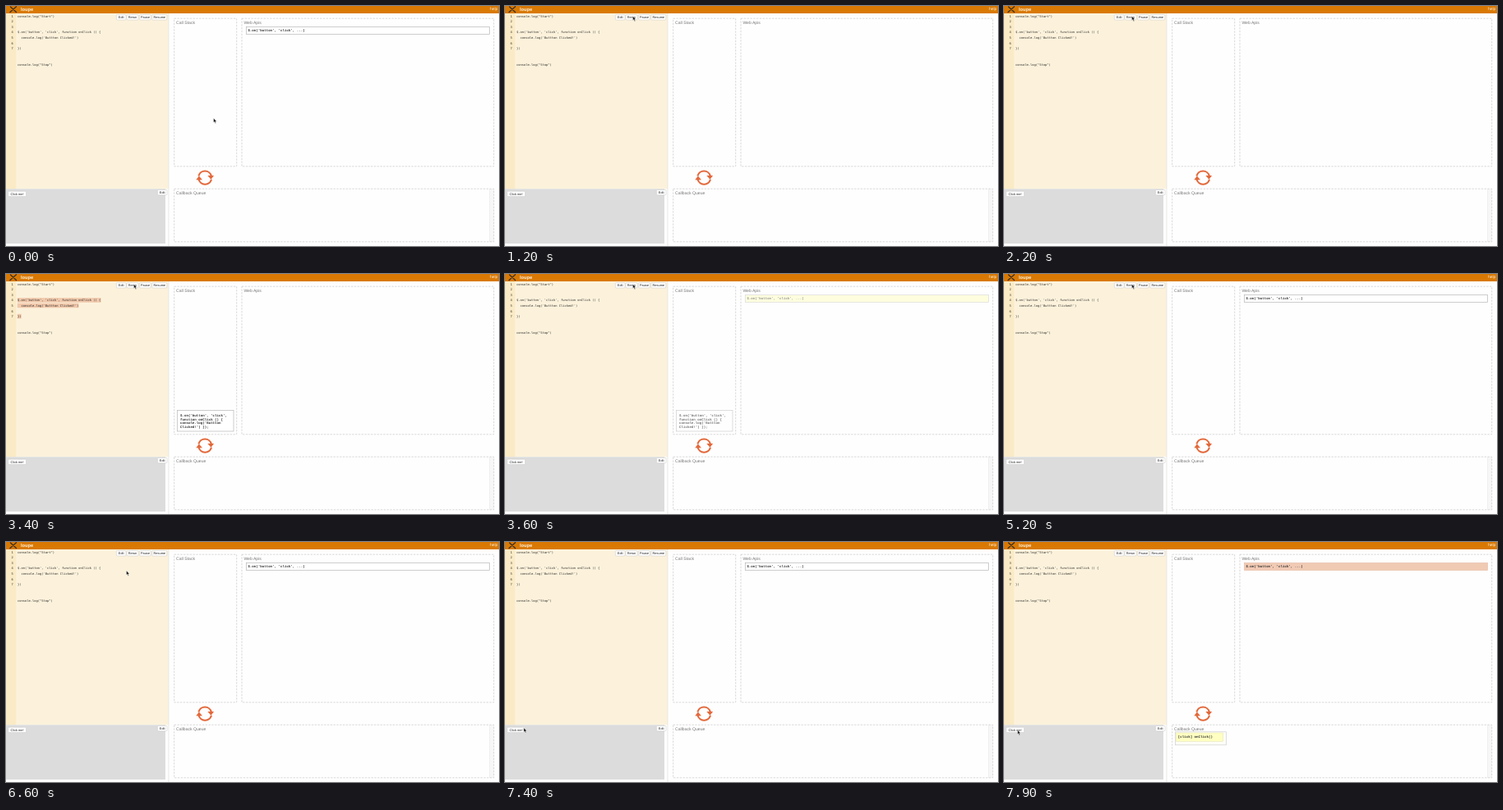
These frames come from a looping animation (600x293 px, 8 s). An HTML page:

```html
<!DOCTYPE html>
<html lang="en">
<head>
<meta charset="utf-8">
<title>Event loop demo</title>
<style>
html, body { margin: 0; width: 100%; height: 100%; overflow: hidden; background: #fefefe; }
svg { display: block; width: 600px; height: 293px; }
text { white-space: pre; text-rendering: geometricPrecision; }
.ui { font-family: "Liberation Sans", Arial, sans-serif; }
.code { font: 3.74px "DejaVu Sans Mono", monospace; fill: #2e2c28; }
.item { font: bold 4.13px "Liberation Mono", monospace; fill: #333; }
</style>
</head>
<body>
<svg id="stage" viewBox="0 0 600 293"></svg>
<script>
const LOOP = 8000, STEP = 100;
const stage = document.getElementById('stage');

function add(tag, attrs, parent = stage, content) {
  const el = document.createElementNS('http://www.w3.org/2000/svg', tag);
  for (const key in attrs) el.setAttribute(key, attrs[key]);
  if (content !== undefined) el.textContent = content;
  parent.appendChild(el);
  return el;
}
const rect = (x, y, width, height, fill, more = {}, parent = stage) =>
  add('rect', { x, y, width, height, fill, ...more }, parent);
const group = () => add('g', {});
const label = (x, y, size, fill, str, more = {}) =>
  add('text', { class: 'ui', x, y, 'font-size': size, fill, ...more }, stage, str);
const show = (el, opacity) => el.setAttribute('opacity', opacity);
const clamp = v => Math.max(0, Math.min(1, v));

function button(x, y, w, str) {
  rect(x, y, w, 6.4, '#fff', { rx: 1, stroke: '#c6c6c6', 'stroke-width': .5 });
  label(x + w / 2, y + 4.6, 3.9, '#222', str, { 'text-anchor': 'middle' });
}

function panel(x, y, w, h, title) {
  rect(x, y, w, h, 'none', { stroke: '#c9c9c9', 'stroke-width': .7, 'stroke-dasharray': '2.4 1.4' });
  label(x + 2.4, y + 7, 5.1, '#777', title);
}

// Boxed task: fill can be tinted, the whole can fade
function task(x, y, w, h, lines, tx, ty) {
  const g = group();
  const box = rect(x, y, w, h, '#fff', { stroke: '#b8b8b8', 'stroke-width': .7 }, g);
  lines.forEach((s, i) => add('text', { class: 'item', x: tx, y: ty + i * 4.6 }, g, s));
  return { g, box };
}

// Header
rect(0, 0, 600, 9, '#d97904');
add('path', { d: 'M5.5 1 12.5 7.5M12.5 .8 5 7.5', stroke: '#3b3020', 'stroke-width': 1.3, fill: 'none', 'stroke-linecap': 'round' });
label(18, 6, 5.7, '#fdf1dc', 'loupe', { 'font-weight': 'bold' });
label(589, 5.3, 4.9, '#fdf1dc', 'help');

// Editor
rect(0, 9, 198, 214.3, '#fcf2dc');
rect(0, 9, 12.3, 214.3, '#faebc6');
rect(197.6, 9, .7, 284, '#e2e0dc');

const lineY = n => 12.4 + (n - 1) * 6.55;
const source = {
  1: 'console.log("Start")',
  4: "$.on('button', 'click', function onClick () {",
  5: "  console.log('Buttton Clicked!')",
  7: '})',
  10: 'console.log("Stop")'
};
const marks = [[1], [4, 5, 7], [10]].map(rows => {
  const g = group();
  rows.forEach(n => rect(13.8, lineY(n) - 2.9, source[n].length * 2.252 + .4, 5.6, '#f1c8ab', {}, g));
  return g;
});
for (let n = 1; n <= 7; n++)
  add('text', { class: 'code', x: 8.8, y: lineY(n) + 1.4, 'text-anchor': 'end' }, stage, n);
for (const n in source)
  add('text', { class: 'code', x: 14, y: lineY(+n) + 1.4 }, stage, source[n]);

button(134.3, 10.6, 11.7, 'Edit');
button(147, 10.6, 14, 'Rerun');
button(162.6, 10.6, 13.6, 'Pause');
button(177.8, 10.6, 18, 'Resume');

// Preview
rect(0, 223.3, 194, 66.7, '#dcdcdc');
button(2.7, 226.2, 21.8, 'Click me!');
button(184.4, 224.4, 11.6, 'Edit');

// Panels
rect(588.5, 223.4, 5.2, 64.4, '#f7f7f7');
rect(588.3, 223.4, .5, 64.4, '#e4e4e4');
panel(204.7, 15.2, 76, 180.6, 'Call Stack');
panel(287, 15.2, 306.7, 180.6, 'Web Apis');
panel(204.7, 223.2, 389, 64.6, 'Callback Queue');

// Event loop arrows: one half, repeated at 180 degrees
for (const turn of [0, 180]) {
  const half = add('g', { transform: `translate(242.2 209.6) rotate(${turn})` });
  add('path', { d: 'M-7.8 -2.2A8 8 0 0 1 7.7 -2', fill: 'none', stroke: '#e3683a', 'stroke-width': 2.1 }, half);
  add('path', { d: 'M3.2 -2.6H10.9L7.3 2.2Z', fill: '#e3683a' }, half);
}

const stack = [
  [[source[1]], 1300, 2000],
  [["$.on('button', 'click',", 'function onClick () {', "console.log('Buttton", "Clicked!') });"], 2800, 3600],
  [[source[10]], 4300, 5000]
].map(([lines, start, end], i) => {
  const h = 11.7 + (lines.length - 1) * 4.6;
  return { ...task(208.5, 192 - h, 68.5, h, lines, 212, 187.8 - (lines.length - 1) * 4.6), start, end, mark: marks[i] };
});
const api = task(292.6, 25.6, 295.8, 8.8, ["$.on('button', 'click', ...)"], 294.4, 31.4);

const queue = group();
rect(208.4, 231.8, 62, 16, '#fdfdf8', { stroke: '#cfcfcf', 'stroke-width': .7 }, queue);
rect(209.4, 233, 57.2, 10.4, '#ffffc2', { stroke: '#e2e2b4', 'stroke-width': .5 }, queue);
add('text', { class: 'item', x: 211.8, y: 239.4 }, queue, '[click] onClick()');

const cursor = add('path', {
  d: 'M0 0V5.2L1.2 4.2 2.1 6.3 3 5.9 2.1 3.9H3.7Z',
  fill: '#111', stroke: '#fff', 'stroke-width': .4
});

// time, x, y of the pointer tip
const path = [
  [0, 252.6, 137], [300, 158, 16], [500, 158, 16], [700, 155.6, 12.4],
  [6500, 155.6, 12.4], [6900, 97.4, 157], [7000, 97.4, 157],
  [7400, 22.8, 226.8], [7600, 16.5, 229.6], [LOOP, 16.5, 229.6]
];
function pointer(t) {
  const i = path.findIndex(p => p[0] > t);
  const [t0, x0, y0] = path[i - 1], [t1, x1, y1] = path[i];
  const u = (t - t0) / (t1 - t0), e = u * u * (3 - 2 * u);
  return [x0 + (x1 - x0) * e, y0 + (y1 - y0) * e];
}

// Pale yellow on entry, turning white
const freshTint = u => `rgb(255 255 ${Math.round(194 + 61 * clamp(u))})`;

function draw(t) {
  for (const s of stack) {
    const live = t >= s.start && t < s.end;
    show(s.mark, live ? 1 : 0);
    show(s.g, t < s.start ? 0 : clamp((t - s.start + 100) / 200) * clamp((s.end + 200 - t) / 300));
    s.box.setAttribute('fill', freshTint((t - s.start) / 200));
  }
  const clicked = t >= 7700;
  show(api.g, t < 3600 ? clamp((900 - t) / 300) : clamp((t - 3500) / 200));
  api.box.setAttribute('fill', clicked ? '#f1cab4' : t < 3600 ? '#fff' : freshTint((t - 3600) / 200));
  api.box.setAttribute('stroke', clicked ? '#e6bea8' : '#b8b8b8');
  show(queue, t < 7800 ? 0 : t < 7900 ? .5 : 1);
  cursor.setAttribute('transform', `translate(${pointer(t)})`);
}

function tick(now) {
  draw(Math.floor((now % LOOP) / STEP) * STEP);
  requestAnimationFrame(tick);
}
draw(0);
requestAnimationFrame(tick);
</script>
</body>
</html>
```
